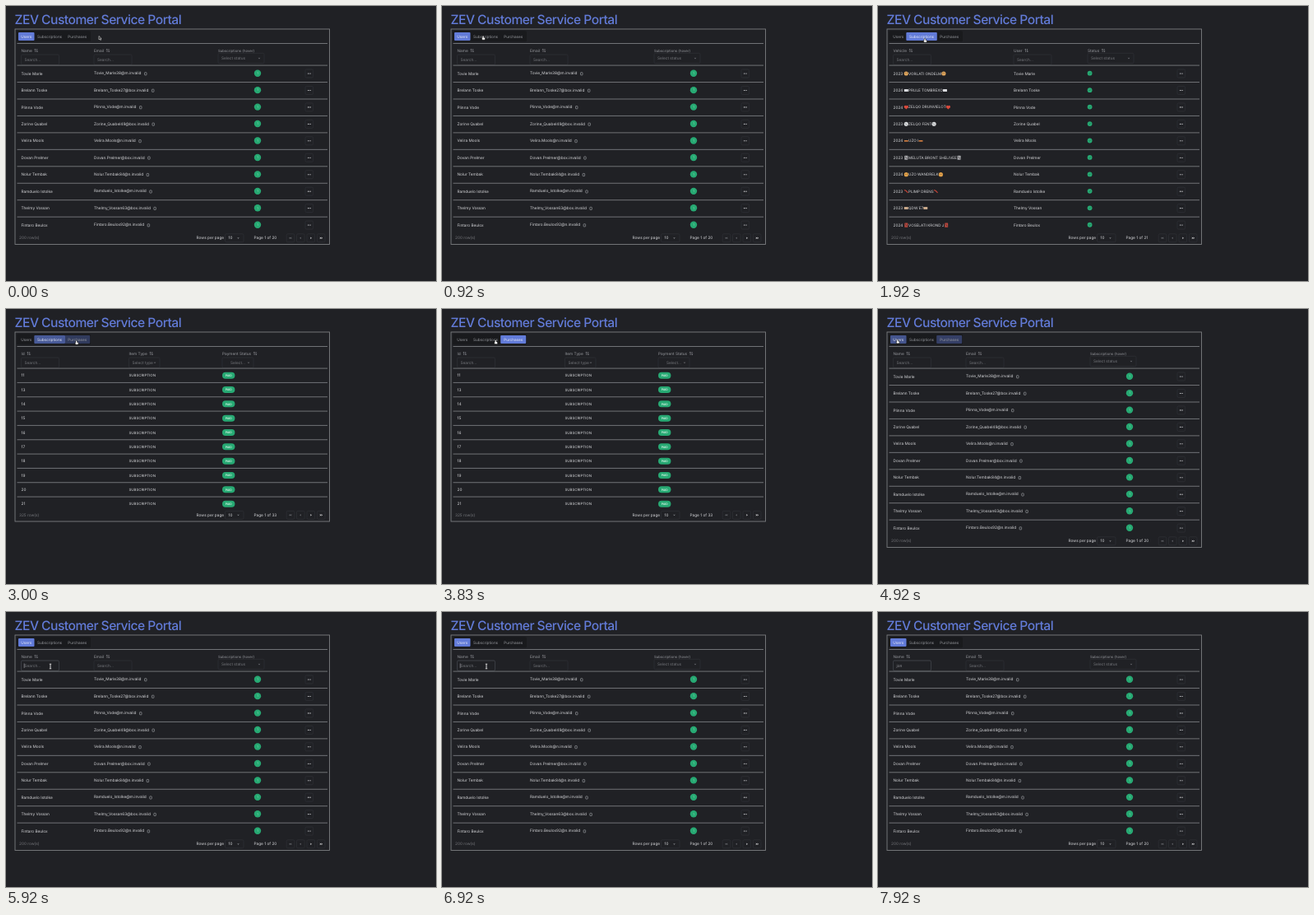
Recreate the animation shown at these times as an HTML page with a canvas. Size 523 px wide and 334 px high, loop 8000 ms.

```html
<!DOCTYPE html>
<html lang="en">
<head>
<meta charset="utf-8">
<title>Customer Service Portal</title>
<style>
  html, body { margin: 0; width: 100%; height: 100%; overflow: hidden; background: #202125; }
  canvas { display: block; width: 523px; height: 334px; }
</style>
</head>
<body>
<canvas id="stage"></canvas>
<script>
const W = 523, H = 334, LOOP = 8000;
const canvas = document.getElementById('stage');
const ctx = canvas.getContext('2d');
const ratio = window.devicePixelRatio || 1;
canvas.width = W * ratio;
canvas.height = H * ratio;

const BG = '#202125', BLUE = '#627bd8', GREEN = '#27a973', TEXT = '#d6d7da',
      MUTED = '#96989d', FAINT = '#74767b', LINE = '#707276', BOX = '#303237';

// name, email separator, digits, mail host
const people = [
  ['Tovie Marle', '_', '38', 'm.invalid'],
  ['Brelann Toske', '_', '27', 'box.invalid'],
  ['Plinna Vode', '_', '', 'm.invalid'],
  ['Zorine Quabel', '_', '49', 'box.invalid'],
  ['Velira Mools', '.', '', 'n.invalid'],
  ['Dovan Prelmer', '.', '', 'box.invalid'],
  ['Nolur Tembak', '.', '84', 'n.invalid'],
  ['Ramduelo Istolke', '_', '', 'm.invalid'],
  ['Thelmy Vossan', '_', '63', 'box.invalid'],
  ['Fintaro Beulox', '.', '92', 'n.invalid']
];

// year, vehicle, icon shape, icon colour
const vehicles = [
  [2023, 'VORLATI ONDELM', 'face', '#dda45c'],
  [2024, 'PRULE TOMBREXO', 'flag', '#d9dade'],
  [2024, 'ZELQO DRUNVIELOT', 'heart', '#d94a3c'],
  [2023, 'ZELQO FENT', 'ball', '#d4d6d8'],
  [2024, 'UZO I', 'car', '#c9793f'],
  [2023, 'MELUTA BRONT SHELIVEE', 'block', '#a9abae'],
  [2024, 'UZO WANDRELK', 'face', '#e0a04a'],
  [2023, 'PLIMP DRENS', 'stick', '#c74336'],
  [2023, 'QDW E7', 'flag', '#c9a98b'],
  [2024, 'VOSELATI KROND J', 'block', '#b9473d']
];
const purchaseIds = [11, 13, 14, 15, 16, 17, 18, 19, 20, 21];

const tabs = [
  { label: 'Users', x: 15, w: 19.5 },
  { label: 'Subscriptions', x: 34.3, w: 37.5 },
  { label: 'Purchases', x: 71.2, w: 31 }
];

const pages = [
  { bottom: 289.5, first: 82, step: 20.45, rows: '200', count: 20, drawRow: userRow,
    columns: [[18.5, 'Name', 46, 'Search...'], [107, 'Email', 46, 'Search...'],
              [258, 'Subscriptions (hover)', 56, 'Select status', true]] },
  { bottom: 289.5, first: 82, step: 20.45, rows: '202', count: 21, drawRow: vehicleRow,
    columns: [[18.5, 'Vehicle', 46, 'Search...'], [165, 'User', 46, 'Search...'],
              [255, 'Status', 56, 'Select status', true]] },
  { bottom: 258, first: 80.7, step: 17.33, rows: '325', count: 33, drawRow: purchaseRow,
    columns: [[18.5, 'Id', 46, 'Search...'], [149.5, 'Item Type', 37.5, 'Select type', true],
              [263, 'Payment Status', 38, 'Select...', true]] }
];

const switches = [[0, 0], [1400, 1], [2950, 2], [4830, 0]];   // time, page
const pointerPath = [                                         // time, x, y
  [0, 113, 36.5], [160, 111, 36.5], [720, 52, 36.5], [920, 50, 36.5], [1350, 55, 38.5],
  [1920, 57, 39.5], [2350, 60, 39], [2800, 85, 38.5], [3150, 86, 38.5], [3500, 85, 38.5],
  [4350, 26, 37], [4670, 23, 36.5], [5050, 24, 37.5], [5600, 52, 65], [5920, 54, 66]
];
const EDIT_START = 5750, KEYS = [7150, 7400, 7650], QUERY = 'jon';

function text(str, x, y, color = TEXT, size = 4.75, weight = 400, align = 'left') {
  ctx.font = `${weight} ${size}px Inter, sans-serif`;
  ctx.textAlign = align;
  ctx.fillStyle = color;
  ctx.fillText(str, x, y + 0.2);
  return ctx.measureText(str).width;
}

function stroke(points, color, width = 0.6) {
  ctx.beginPath();
  points.forEach(([x, y]) => ctx.lineTo(x, y));
  ctx.strokeStyle = color;
  ctx.lineWidth = width;
  ctx.stroke();
}

function box(x, y, w, h, r, fill, border) {
  ctx.beginPath();
  ctx.roundRect(x, y, w, h, r);
  if (fill) { ctx.fillStyle = fill; ctx.fill(); }
  if (border) { ctx.strokeStyle = border; ctx.lineWidth = 0.7; ctx.stroke(); }
}

function disc(x, y, r, color) {
  ctx.beginPath();
  ctx.arc(x, y, r, 0, Math.PI * 2);
  ctx.fillStyle = color;
  ctx.fill();
}

function chevron(x, y, dx, dy, color) {
  stroke([[x - dx - dy, y - dy - dx], [x + dx, y + dy], [x - dx + dy, y - dy + dx]], color, 0.7);
}

function sortIcon(x, y) {
  stroke([[x - 1, y - 0.8], [x, y - 2], [x, y + 2]], MUTED);
  stroke([[x + 2, y - 2], [x + 2, y + 2], [x + 3, y + 0.8]], MUTED);
}

function menuButton(y) {
  box(364, y - 5, 9.6, 10, 1.5, null, BOX);
  for (let i = -1; i <= 1; i++) disc(368.8 + i * 1.5, y, 0.55, TEXT);
}

function userRow(i, y) {
  const [name, sep, digits, host] = people[i];
  text(name, 18.5, y);
  const end = 107 + text(name.replace(' ', sep) + digits + '@' + host, 107, y - 0.3);
  box(end + 4, y - 1.3, 2.5, 3.2, 0.5, null, MUTED);
  disc(306, y - 0.3, 4.2, GREEN);
  text('1', 306, y - 0.3, '#8fdcb9', 3.8, 400, 'center');
  menuButton(y);
}

function icon(shape, x, y, color) {
  if (shape === 'face' || shape === 'ball') {
    disc(x, y, 2.6, color);
    if (shape === 'ball') stroke([[x - 2, y - 1], [x, y], [x + 1, y + 2]], '#85888c', 0.5);
    else {
      disc(x - 0.8, y - 0.4, 0.4, '#49331f');
      disc(x + 0.8, y - 0.4, 0.4, '#49331f');
    }
  } else if (shape === 'heart') {
    disc(x - 1.1, y - 0.7, 1.5, color);
    disc(x + 1.1, y - 0.7, 1.5, color);
    ctx.beginPath();
    ctx.moveTo(x - 2.5, y);
    ctx.lineTo(x + 2.5, y);
    ctx.lineTo(x, y + 2.7);
    ctx.fill();
  } else if (shape === 'stick') {
    stroke([[x - 2.2, y - 1.6], [x, y - 0.6], [x + 2.2, y + 1.8]], color, 1.1);
  } else if (shape === 'block') {
    box(x - 2, y - 2.6, 4, 5.2, 0.5, color);
    stroke([[x - 1, y - 1.5], [x + 1, y + 1.5]], '#3c3034', 0.7);
  } else {
    const h = shape === 'car' ? 1.8 : 3;
    box(x - 2.5, y - h / 2, 5, h, 0.5, color);
  }
}

function vehicleRow(i, y) {
  const [year, vehicle, shape, color] = vehicles[i];
  let x = 18.5 + text(year + ' ', 18.5, y);
  icon(shape, x + 2.7, y, color);
  x += 5.5;
  x += text(vehicle, x, y, TEXT, 4.6);
  icon(shape, x + 2.7, y, color);
  text(people[i][0], 165, y);
  disc(257.6, y - 0.3, 2.9, GREEN);
  stroke([[256.4, y - 0.3], [257.3, y + 0.6], [258.9, y - 1.2]], '#1d6f50', 0.6);
  menuButton(y);
}

function purchaseRow(i, y) {
  text(purchaseIds[i], 18.5, y);
  text('SUBSCRIPTION', 149.5, y, TEXT, 4.4);
  box(263, y - 4, 15.4, 8, 4, GREEN);
  text('PAID', 270.7, y, '#d9f5e8', 3.5, 600, 'center');
}

function pageAt(t) {
  return switches.filter(([start]) => start <= t).pop();
}

function drawTabs(t) {
  const [start, current] = pageAt(t);
  const previous = start ? pageAt(start - 1)[1] : current;
  const fade = start ? Math.min(1, (t - start) / 150) : 1;
  box(13, 30.3, 90, 13, 1.5, '#191a1d');
  tabs.forEach(({ label, x, w }, i) => {
    const active = i === current ? fade : i === previous ? 1 - fade : 0;
    ctx.globalAlpha = active;
    box(x, 32, w, 10, 1, BLUE);
    ctx.globalAlpha = 1;
    text(label, x + w / 2, 37, active > 0.5 ? '#e6e9f6' : MUTED, 4.65, 400, 'center');
  });
}

function drawHeader(columns, t) {
  columns.forEach(([x, label, width, hint, select], i) => {
    const end = x + text(label, x, 54, MUTED, select && label.length > 16 ? 4.35 : 4.75);
    if (label.length < 16) sortIcon(end + 4, 54);
    const top = select && width > 50 ? 57.3 : 59;
    const middle = top + 6.2;
    box(x, top, width, 12.4, 1.5, null, BOX);
    const editing = i === 0 && t >= EDIT_START;
    const typed = editing ? QUERY.slice(0, KEYS.filter(k => k <= t).length) : '';
    const inset = hint === 'Select...' ? 10 : 4;
    const w = text(typed || hint, x + inset, middle, typed ? MUTED : FAINT);
    if (select) chevron(x + width - 6, middle, 0, 0.65, FAINT);
    if (editing) {
      box(x, top, width, 12.4, 1.5, null, '#43464d');
      const caret = x + inset + (typed ? w + 0.4 : -0.3);
      const blink = (t - EDIT_START) % 1000 < 500 && t < LOOP - 150;
      if (blink) stroke([[caret, middle - 2.7], [caret, middle + 2.7]], TEXT, 0.5);
    }
  });
}

function drawFooter({ bottom, rows, count }) {
  const y = bottom - 7.7;
  text(rows + ' row(s)', 16, y, FAINT);
  text('Rows per page', 231.5, y);
  box(266.5, y - 5, 22.5, 10, 1.5, null, BOX);
  text('10', 270.5, y);
  chevron(282.5, y, 0, 0.65, MUTED);
  text('Page 1 of ' + count, 301.5, y);
  [346, 358.3, 370.8, 383.2].forEach((x, i) => {
    const side = i < 2 ? -0.65 : 0.65, color = i < 2 ? FAINT : '#eeeeef';
    box(x - 4.8, y - 5, 9.6, 10, 1.5, null, BOX);
    if (i % 3) chevron(x, y, side, 0, color);
    else for (const d of [-0.8, 0.8]) chevron(x + d, y, side, 0, color);
  });
}

function pointerAt(t) {
  const next = pointerPath.findIndex(([time]) => time > t);
  if (next < 0) return pointerPath[pointerPath.length - 1].slice(1);
  const [t0, x0, y0] = pointerPath[next - 1], [t1, x1, y1] = pointerPath[next];
  const u = (t - t0) / (t1 - t0), e = u * u * (3 - 2 * u);
  return [x0 + (x1 - x0) * e, y0 + (y1 - y0) * e];
}

function drawPointer(t) {
  if (t >= KEYS[0]) return;
  const [x, y] = pointerAt(t);
  if (y > 59) {
    stroke([[x - 1.2, y - 2.8], [x + 1.2, y - 2.8]], '#fff', 0.7);
    stroke([[x, y - 2.8], [x, y + 2.8]], '#fff', 0.8);
    stroke([[x - 1.2, y + 2.8], [x + 1.2, y + 2.8]], '#fff', 0.7);
  } else if (x < 102 && y < 43) {
    box(x - 0.6, y - 0.3, 1.3, 4, 0.6, '#fff', '#111');
    box(x - 1.5, y + 1.7, 4, 3, 1, '#fff', '#111');
    box(x - 0.5, y, 1.1, 3, 0.5, '#fff');
  } else {
    ctx.beginPath();
    [[0, 0], [0, 4.3], [1, 3.4], [1.8, 5], [2.6, 4.6], [1.9, 3.1], [3.1, 3.1]]
      .forEach(([dx, dy]) => ctx.lineTo(x + dx, y + dy));
    ctx.closePath();
    ctx.fillStyle = '#111';
    ctx.fill();
    ctx.strokeStyle = '#e8e8e8';
    ctx.lineWidth = 0.6;
    ctx.stroke();
  }
}

function draw(t) {
  const page = pages[pageAt(t)[1]];
  ctx.setTransform(ratio, 0, 0, ratio, 0, 0);
  ctx.textBaseline = 'middle';
  ctx.textRendering = 'geometricPrecision';
  ctx.fillStyle = BG;
  ctx.fillRect(0, 0, W, H);

  ctx.letterSpacing = '-0.5px';
  text('ZEV Customer Service Portal', 10.5, 17.5, BLUE, 15.6, 500);
  ctx.letterSpacing = '0px';

  ctx.strokeStyle = '#7b7d81';
  ctx.lineWidth = 0.9;
  ctx.strokeRect(11, 28, 382.5, page.bottom - 28);
  drawTabs(t);
  stroke([[13.5, 45.5], [391, 45.5]], LINE, 1);
  drawHeader(page.columns, t);
  for (let i = 0; i < 10; i++) {
    const lineY = 72.1 + i * page.step;
    stroke([[13.5, lineY], [391, lineY]], LINE, 1);
    page.drawRow(i, page.first + i * page.step);
  }
  drawFooter(page);
  drawPointer(t);
}

function frame() {
  draw(performance.now() % LOOP);
  requestAnimationFrame(frame);
}
frame();
</script>
</body>
</html>
```
